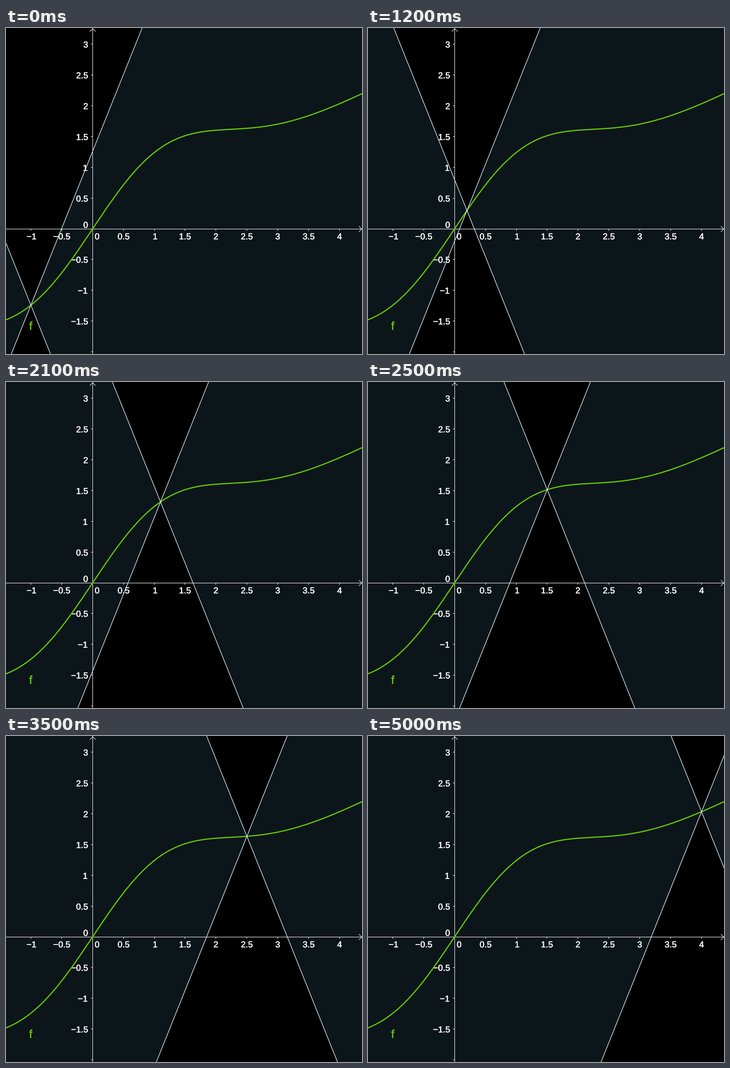
Animation, 737 px wide and 677 px high, one loop 5.1 s. Source, as a matplotlib script:

```python
import numpy as np
import matplotlib.pyplot as plt
from matplotlib.animation import FuncAnimation
from matplotlib.patheffects import withStroke

W, H, DPI = 737, 677, 64      # stage in pixels
OX, OY, UNIT = 179.3, 417.05, 127.78
PX = 72 / DPI                 # points per pixel
SLOPE = 2.5                   # Lipschitz constant of the cone
FRAMES, STEP_MS = 51, 100

WHITE, GREEN = "#ffffff", "#66cc00"
SHADE, EDGE = "#0c151a", "#e6f6ff"


def f(x):
    return x / 2 + x * np.exp(-0.3 * x * x)


def to_px(x, y):
    return OX + UNIT * x, OY - UNIT * y


def crisp(p):
    """Centre of the pixel that holds p."""
    return np.floor(p) + 0.5


fig = plt.figure(figsize=(W / DPI, H / DPI), dpi=DPI, facecolor="black")
ax = fig.add_axes([0, 0, 1, 1])
ax.set_xlim(0, W)
ax.set_ylim(H, 0)
ax.axis("off")


def line(xs, ys, color=WHITE, width=1.0, z=2, **kw):
    return ax.plot(xs, ys, color=color, lw=width * PX, zorder=z, snap=False,
                   solid_capstyle="butt", **kw)[0]


def label(x, y, text, ha="center", color=WHITE, size=18):
    bolder = withStroke(linewidth=0.4 * PX, foreground=color)
    ax.text(x, y, text, ha=ha, va="baseline", color=color,
            fontsize=size * PX, family="Liberation Sans", zorder=3,
            path_effects=[bolder])


def number(v):
    return f"{v:g}".replace("-", "\u2212")


def draw_axes():
    x0, y0 = crisp(OX), crisp(OY)
    line([0, W], [y0, y0])
    line([x0, x0], [0, H])
    line([x0 - 6, x0, x0 + 6], [7.5, 1.5, 7.5], solid_joinstyle="miter")
    line([W - 6.5, W - 0.5, W - 6.5], [y0 - 6, y0, y0 + 6],
         solid_joinstyle="miter")

    for v in np.arange(-1, 4.1, 0.5):
        if v == 0:
            continue
        x = crisp(to_px(v, 0)[0])
        line([x, x], [y0, y0 + 3.5])
        text = number(v)
        nudge = 1.2 if text.endswith("1") else 0
        label(x + nudge, 439, text)

    for v in np.arange(-2, 3.1, 0.5):
        if v == 0:
            continue
        y = crisp(to_px(0, v)[1])
        line([x0 - 3.5, x0], [y, y])
        if v > -2:
            text = number(v)
            right = 169 if text.endswith("1") else 170
            label(right, y + 7, text, ha="right")

    label(188.7, 439, "0")
    label(165, 415, "0")


draw_axes()
xs = np.linspace(-1.45, 4.45, 400)
line(*to_px(xs, f(xs)), color=GREEN, width=2.4, z=4)
label(51.2, 627, "f", color=GREEN, size=24)

sides = [ax.fill([0, 1, 1], [0, 0, 1], color=SHADE, lw=0, zorder=1)[0]
         for _ in range(2)]
edges = [line([], [], color=EDGE, width=1.25, z=5) for _ in range(2)]


def update(i):
    a = -1 + i / 10
    cx, cy = to_px(a, f(a))
    reach = 1000
    rise = SLOPE * reach
    for side, edge, sign in zip(sides, edges, (-1, 1)):
        far = cx + sign * reach
        side.set_xy([(cx, cy), (far, cy - rise), (far, cy + rise)])
        edge.set_data([cx - reach, cx + reach],
                      [cy - sign * rise, cy + sign * rise])
    return sides + edges


anim = FuncAnimation(fig, update, frames=FRAMES, interval=STEP_MS,
                     repeat=True, repeat_delay=0)
plt.show()
```
